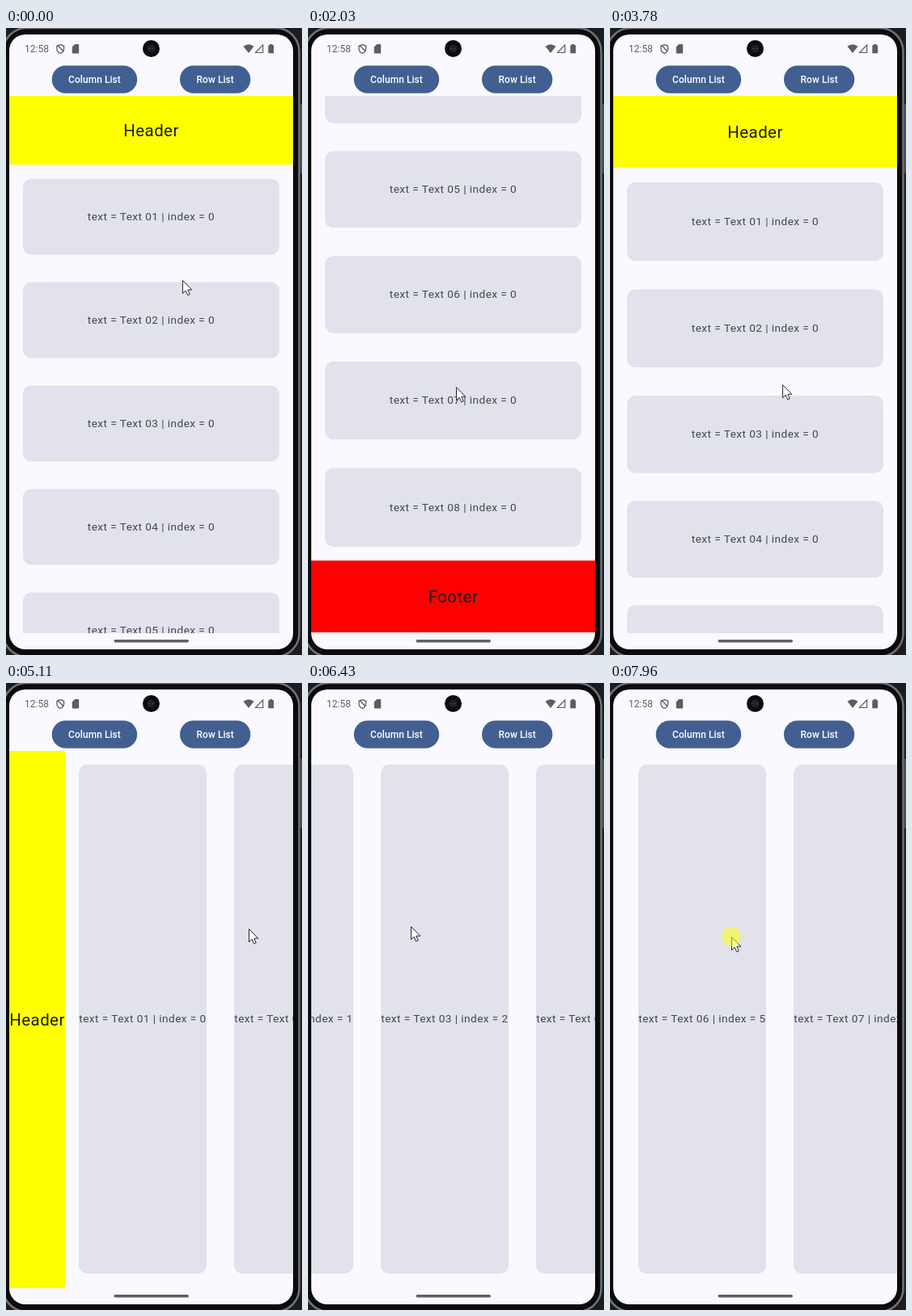
Animation, 366 px wide and 776 px high, one loop 8000 ms. Source, as an HTML page:

```html
<!DOCTYPE html>
<html lang="en">
<head>
<meta charset="utf-8">
<title>Column and row lists</title>
<style>
  html, body { margin: 0; width: 100%; height: 100%; overflow: hidden; background: #1b1c1f; }
  svg { display: block; width: 366px; height: 776px; font-family: Roboto, sans-serif; }
  .item { font-size: 13.66px; letter-spacing: .427px; fill: #44474e; text-anchor: middle; }
  .title { font-size: 20.5px; letter-spacing: .427px; fill: #191c20; text-anchor: middle; }
  .label { font-size: 11.95px; letter-spacing: .085px; font-weight: 500; fill: #fff; text-anchor: middle; }
</style>
</head>
<body>
<svg viewBox="0 0 366 776">
  <defs><clipPath id="view"><rect x="4" y="84" width="351" height="665"/></clipPath></defs>

  <!-- phone body -->
  <rect x="-3.5" y="0" width="366" height="778" rx="29" fill="#0b0b0d" stroke="#707175" stroke-width="2.5"/>
  <rect x="364" y="94" width="2" height="86" fill="#46484c"/>
  <rect x="4" y="8" width="351" height="761" rx="20" fill="#f9f9ff"/>

  <!-- status bar -->
  <g fill="#5d5d64">
    <text x="23" y="30.2" font-size="12">12:58</text>
    <path d="M67.3 20.6l4.3 1.7v3.4q0 4-4.3 5.6q-4.3-1.6-4.3-5.6v-3.4zM64.3 21.8l6.5 7" fill="none" stroke="#5d5d64" stroke-width="1.3"/>
    <path d="M85.2 20h4q1 0 1 1v9.5q0 1-1 1h-6.4q-1 0-1-1v-7z"/>
    <path d="M293.5 22.7q6.5-5 13 0l-6.5 8.3z"/>
    <path d="M317.7 21v9.5h-9.2z" fill="none" stroke="#5d5d64" stroke-width="1.2"/>
    <path d="M326 20h3.4v1.3h1.7v10h-6.8v-10h1.7z"/>
  </g>
  <circle cx="179.5" cy="25.5" r="10.5" fill="#0c0c0e"/>
  <circle cx="179.5" cy="25.5" r="5" fill="#202024"/>
  <path d="M176.5 25.5h2m2 0h2" stroke="#44464c"/>

  <!-- buttons -->
  <g fill="#415f91">
    <rect x="56.7" y="46.5" width="105.5" height="34.2" rx="17.1"/>
    <rect x="215" y="46.5" width="87.3" height="34.2" rx="17.1"/>
  </g>
  <text class="label" x="109.5" y="67.5">Column List</text>
  <text class="label" x="258.7" y="67.5">Row List</text>

  <g clip-path="url(#view)"><g id="column"></g><g id="row"></g></g>

  <rect x="133.5" y="757" width="92.5" height="3.4" rx="1.7" fill="#5f5f65"/>
  <path id="cursor" d="M.5.5v16l3.7-3.4l2.4 5.6l2.6-1.1l-2.4-5.5h5z" fill="#fff" stroke="#26262c" stroke-linejoin="round"/>
  <circle id="press" r="12" fill="#ff0" opacity=".5"/>
</svg>
<script>
const LOOP = 8000, TOP = 84, BOTTOM = 749, BAND = 85, PITCH = 128, ROW_PITCH = 192;
const ROW_AT = 4620, COUNT = 8;
const $ = id => document.getElementById(id);

const smooth = p => p * p * (3 - 2 * p);
const linear = p => p;
const out = p => 1 - (1 - p) ** 2.5;

// Each key: time, easing used to reach it, values
const cursorKeys = [
  [0, smooth, 218, 312], [800, smooth, 224.5, 449], [900, smooth, 224.5, 449],
  [1130, linear, 222, 270], [1200, smooth, 222, 268], [1420, linear, 220, 372],
  [1590, out, 200, 460], [1790, linear, 195, 270], [1850, smooth, 194, 268],
  [2030, linear, 183, 444], [2200, out, 183, 460], [2800, smooth, 200, 262],
  [2890, smooth, 200, 262], [3120, linear, 206, 455], [3150, smooth, 206, 455],
  [3400, smooth, 210, 270], [3460, smooth, 210, 270], [3650, linear, 212, 450],
  [3740, smooth, 212, 450], [4200, smooth, 260, 55], [4450, smooth, 262, 58],
  [5020, smooth, 266, 60], [5110, smooth, 300, 304], [5250, smooth, 300, 304],
  [5520, linear, 127, 301], [6430, smooth, 127, 301], [6680, smooth, 285, 308],
  [6930, linear, 125, 310], [7050, smooth, 125, 310], [7500, smooth, 300, 313],
  [7750, smooth, 300, 314], [7890, linear, 247, 314], [7960, linear, 150, 314]
];
const columnKeys = [
  [900, linear, 0], [1130, linear, 170], [1420, out, 204], [1590, linear, 204],
  [1790, linear, 394], [1960, linear, 530], [2890, linear, 530], [3120, linear, 348],
  [3150, linear, 336], [3400, out, 240], [3460, linear, 240], [3650, linear, 66], [3730, linear, 0]
];
const rowKeys = [
  [5250, linear, 0], [5520, linear, 173], [6090, out, 384], [6680, linear, 384],
  [6930, linear, 544], [7650, out, 865], [7750, linear, 865], [7890, linear, 918], [7960, linear, 1015]
];
// Overscroll: positive at the bottom edge, negative at the top
const stretchKeys = [
  [1940, linear, 0], [2030, out, 1], [2380, smooth, 0], [3710, linear, 0], [3800, out, -1], [4100, smooth, 0]
];
const presses = [[800, 1130], [1560, 1790], [2850, 3120], [3420, 3650], [4450, 4600], [5210, 5520], [6640, 6930], [7710, LOOP]];

function track(keys, t) {
  const i = keys.findIndex(k => k[0] > t);
  if (i < 0) return keys.at(-1).slice(2);
  if (!i) return keys[0].slice(2);
  const a = keys[i - 1], b = keys[i], p = b[1]((t - a[0]) / (b[0] - a[0]));
  return b.slice(2).map((v, j) => a[j + 2] + (v - a[j + 2]) * p);
}

function add(parent, tag, attrs, text = '') {
  const el = document.createElementNS('http://www.w3.org/2000/svg', tag);
  for (const k in attrs) el.setAttribute(k, attrs[k]);
  el.textContent = text;
  return parent.appendChild(el);
}

function box(parent, x, y, width, height, fill, rx, kind, text) {
  const rect = add(parent, 'rect', { x, y, width, height, fill, rx });
  const drop = kind === 'title' ? 7.2 : 4.4;
  const label = add(parent, 'text', { class: kind, x: x + width / 2, y: y + height / 2 + drop }, text);
  return { rect, label, y, height, drop };
}

const card = (parent, x, y, w, h, i, index) =>
  box(parent, x, y, w, h, '#e1e2eb', 10.25, 'item', `text = Text 0${i + 1} | index = ${index}`);

const column = $('column'), row = $('row');
const items = [box(column, 4, TOP, 351, BAND, '#ff0', 0, 'title', 'Header')];
box(row, 4, TOP, 69, BOTTOM - TOP, '#ff0', 0, 'title', 'Header');
for (let i = 0; i < COUNT; i++) {
  items.push(card(column, 21, 186.6 + i * PITCH, 317, 93.8, i, 0));
  card(row, 90 + i * ROW_PITCH, 101, 158, 630, i, i);
}
items.push(box(column, 4, TOP + BAND + COUNT * PITCH, 351, BAND, '#f00', 0, 'title', 'Footer'));

function warp(y, s) {
  const d = s > 0 ? BOTTOM - y : y - TOP;
  return y - s * d * (.0475 - 3.4e-5 * d);
}

function draw(t) {
  const isRow = t >= ROW_AT;
  column.style.display = isRow ? 'none' : '';
  row.style.display = isRow ? '' : 'none';
  row.setAttribute('transform', `translate(${-track(rowKeys, t)[0]})`);

  const [scroll] = track(columnKeys, t), [s] = track(stretchKeys, t);
  for (const it of items) {
    const y = it.y - scroll, top = warp(y, s), end = warp(y + it.height, s);
    it.rect.setAttribute('y', top);
    it.rect.setAttribute('height', end - top);
    it.label.setAttribute('y', (top + end) / 2 + it.drop);
  }

  const at = `translate(${track(cursorKeys, t)})`;
  $('cursor').setAttribute('transform', at);
  $('press').setAttribute('transform', at);
  $('press').style.display = presses.some(([a, b]) => t >= a && t < b) ? '' : 'none';
}

function frame() {
  draw(performance.now() % LOOP);
  requestAnimationFrame(frame);
}
frame();
</script>
</body>
</html>
```
